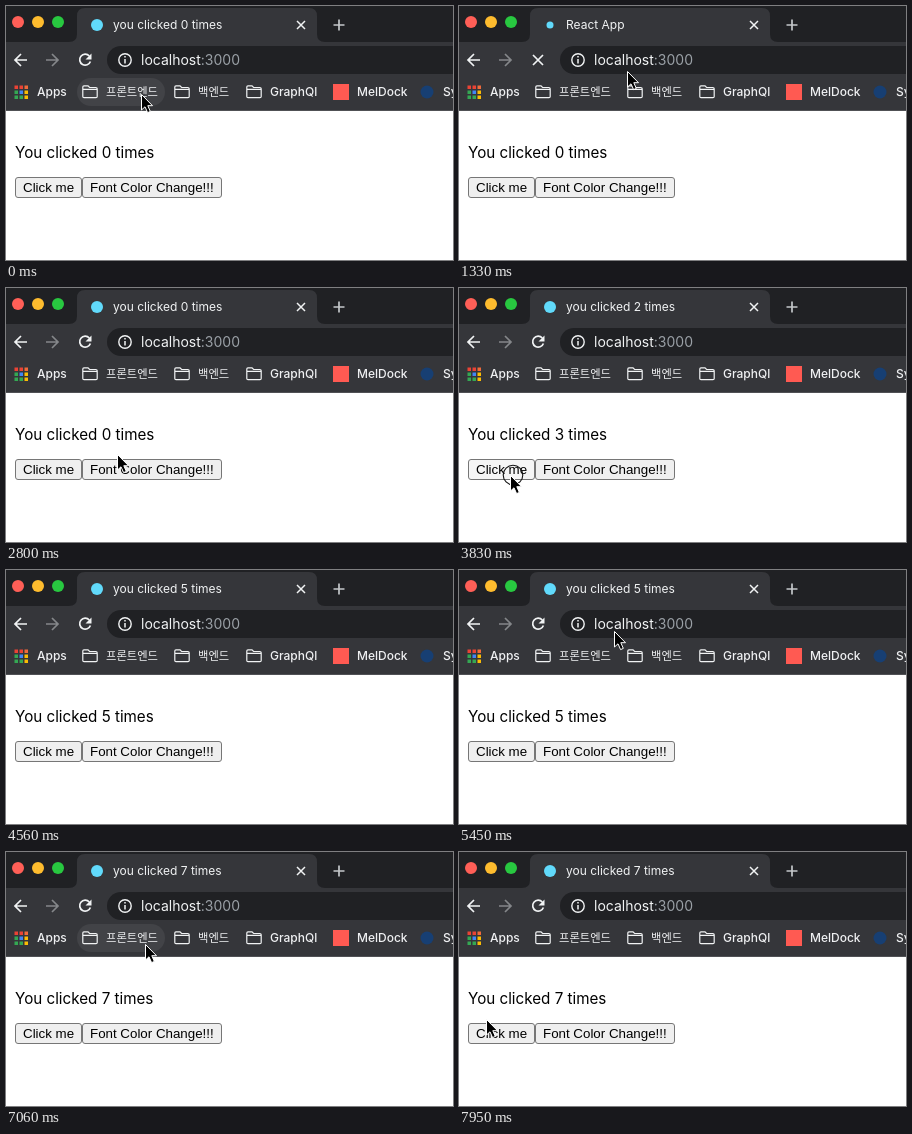
Recreate the animation shown at these times as an HTML page. Size 447 by 254 pixels, loop 8 s.

```html
<!DOCTYPE html>
<html lang="en">
<head>
<meta charset="utf-8">
<title>Click counter</title>
<style>
  html, body { margin: 0; width: 100%; height: 100%; overflow: hidden; background: #fff; }
  svg { display: block; width: 447px; height: 254px; }
  text { font-family: Inter, "Noto Sans CJK KR", "Noto Sans CJK", sans-serif; white-space: pre; }
  .bar { font-size: 12px; font-weight: 500; fill: #eff0f2; }
  .korean { font-size: 11.3px; font-family: "Noto Sans CJK KR", "Noto Sans CJK", sans-serif; }
  .button text { font: 13.333px "Liberation Sans", Arial, sans-serif; }
  .button rect { fill: #efefef; stroke: #767676; }
  .line { fill: none; stroke: #f1f3f4; stroke-width: 1.7; }
</style>
</head>
<body>
<svg viewBox="0 0 447 254">
  <defs>
    <path id="folder" class="line" style="stroke-width:1.2" d="M.8 11.5V2q0-1.2 1.2-1.2h4l1.6 1.7h6.2q1.4 0 1.4 1.3v7.7q0 1.2-1.2 1.2H2Q.8 12.700.8 11.500zM1 4.400h14"/>
  </defs>
  <rect width="447" height="105" fill="#202124"/>
  <path d="M0 36H63Q71 36 71 28V10Q71 2 79 2H303Q311 2 311 10V28Q311 36 319 36H447V104H0z" fill="#35363a"/>
  <path d="M0 104.500H447" stroke="#505155"/>
  <circle cx="12" cy="16" r="6" fill="#ff5f57"/>
  <circle cx="32" cy="16" r="6" fill="#febc2e"/>
  <circle cx="52" cy="16" r="6" fill="#28c840"/>
  <circle id="tabIcon" cx="91" cy="19" fill="#61dafb"/>
  <text id="tabTitle" x="107" y="23" font-size="12" fill="#f1f3f4"/>
  <path class="line" style="stroke-width:1.5" d="M291 15l8 8m0-8l-8 8"/>
  <path class="line" style="stroke:#c4c7ca" d="M327.500 19h11m-5.500-5.500v11"/>

  <path class="line" d="M21 54H9m6-6l-6 6 6 6"/>
  <path class="line" style="stroke:#85878a" d="M40 54H52m-6-6l6 6-6 6"/>
  <g id="reload">
    <path class="line" d="M83.300 50A5.500 5.500 0 1 0 84.400 55.500"/>
    <path d="M85.500 47.500v6h-6z" fill="#f1f3f4"/>
  </g>
  <path id="stop" class="line" d="M74 49l10 10m0-10l-10 10"/>
  <rect x="101" y="40" width="370" height="28" rx="14" fill="#202124"/>
  <circle class="line" style="stroke-width:1.4" cx="119" cy="54" r="6.200"/>
  <path class="line" style="stroke-width:1.500" d="M119 53v4.500m0-7.500v1.600"/>
  <text x="135" y="59" font-size="14" fill="#f1f3f4">localhost<tspan fill="#9aa0a6">:3000</tspan></text>

  <rect id="pill" x="71" y="72" width="88" height="28" rx="14" fill="#424347"/>
  <g id="apps"></g>
  <use href="#folder" x="76" y="79"/>
  <use href="#folder" x="168" y="79"/>
  <use href="#folder" x="240" y="79"/>
  <rect x="327" y="78" width="16" height="16" fill="#ff5a52"/>
  <circle cx="421" cy="86" r="6.500" fill="#173f73"/>
  <g class="bar">
    <text x="31" y="90">Apps</text>
    <text class="korean" x="100" y="90">프론트엔드</text>
    <text class="korean" x="192" y="90">백엔드</text>
    <text x="264" y="90">GraphQl</text>
    <text x="351" y="90">MelDock</text>
    <text x="437" y="90">Sy</text>
  </g>

  <text id="message" x="9" y="152" font-size="15.200"/>
  <g class="button">
    <rect id="clickButton" x="9.500" y="171.500" width="66" height="20" rx="2.500"/>
    <text x="17" y="186">Click me</text>
    <rect id="colorButton" x="76.500" y="171.500" width="139" height="20" rx="2.500"/>
    <text x="84" y="186">Font Color Change!!!</text>
  </g>
  <g id="cursor">
    <circle id="press" cx="3" cy="0" r="9.800" fill="none" stroke="#111" stroke-width="1.100"/>
    <path d="M.5 .5V16L4 12.800 6.600 18.600 9.300 17.400 6.800 11.700H11.500z" fill="#000" stroke="#fff"/>
  </g>
</svg>
<script>
const LOOP = 8000, STEP = 147.1, OFFSET = 10;
const el = id => document.getElementById(id);
const show = (id, on) => el(id).setAttribute('visibility', on ? 'visible' : 'hidden');

// Pointer path: [step, x, y]
const path = [
  [0, 135, 88], [3, 105, 131], [6, 166, 12], [9, 168, 65], [14, 113, 160],
  [19, 111, 166], [20, 60, 198], [21, 51, 187], [30, 51, 187], [33, 185, 15],
  [36, 185, 20], [40, 65, 182], [46, 65, 182], [50, 212, 1], [54, 27, 167]
];
const countSteps = [22, 24, 26, 28, 30, 42, 44];
const pressSteps = [22, 24, 26, 28, 30, 41, 43];

const appColors = ['#ea4335', '#ea4335', '#f06a3a', '#34a853', '#4285f4', '#fbbc04', '#34a853', '#34a853', '#fbbc04'];
el('apps').innerHTML = appColors.map((color, i) =>
  `<rect x="${8.5 + i % 3 * 5}" y="${79.5 + Math.floor(i / 3) * 5}" width="3.500" height="3.500" fill="${color}"/>`).join('');

function pointerAt(step) {
  const i = Math.max(1, path.findIndex(key => key[0] >= step));
  const [s0, x0, y0] = path[i - 1], [s1, x1, y1] = path[i];
  const k = (step - s0) / (s1 - s0);
  return [x0 + (x1 - x0) * k, y0 + (y1 - y0) * k];
}

const countAt = step => countSteps.filter(s => s <= step).length;
const inside = ([x, y], left, top, right, bottom) => x >= left && x < right && y >= top && y < bottom;

function draw(time) {
  const step = Math.min(54, Math.floor((time % LOOP + OFFSET) / STEP));
  const pointer = pointerAt(step);
  const visible = step < 31 || step > 32;
  const pressed = pressSteps.includes(step);
  const loading = step >= 9 && step < 17;
  const hoverFill = (...box) => !visible || !inside(pointer, ...box) ? '#efefef' : pressed ? '#f5f5f5' : '#e5e5e5';

  el('message').textContent = `You clicked ${countAt(step)} times`;
  el('tabTitle').textContent = step >= 9 && step < 12 ? 'React App' : `you clicked ${countAt(step - 1)} times`;
  el('tabIcon').setAttribute('r', loading ? 3.5 : 6);
  show('stop', loading);
  show('reload', !loading);
  show('pill', inside(pointer, 71, 72, 159, 100));
  el('clickButton').style.fill = hoverFill(9, 171, 76, 192);
  el('colorButton').style.fill = hoverFill(76, 171, 216, 192);
  el('cursor').setAttribute('transform', `translate(${pointer.map(Math.round)})`);
  el('cursor').style.display = visible ? '' : 'none';
  show('press', pressed);
}

const start = performance.now();
function tick() {
  draw(performance.now() - start);
  requestAnimationFrame(tick);
}
tick();
</script>
</body>
</html>
```
